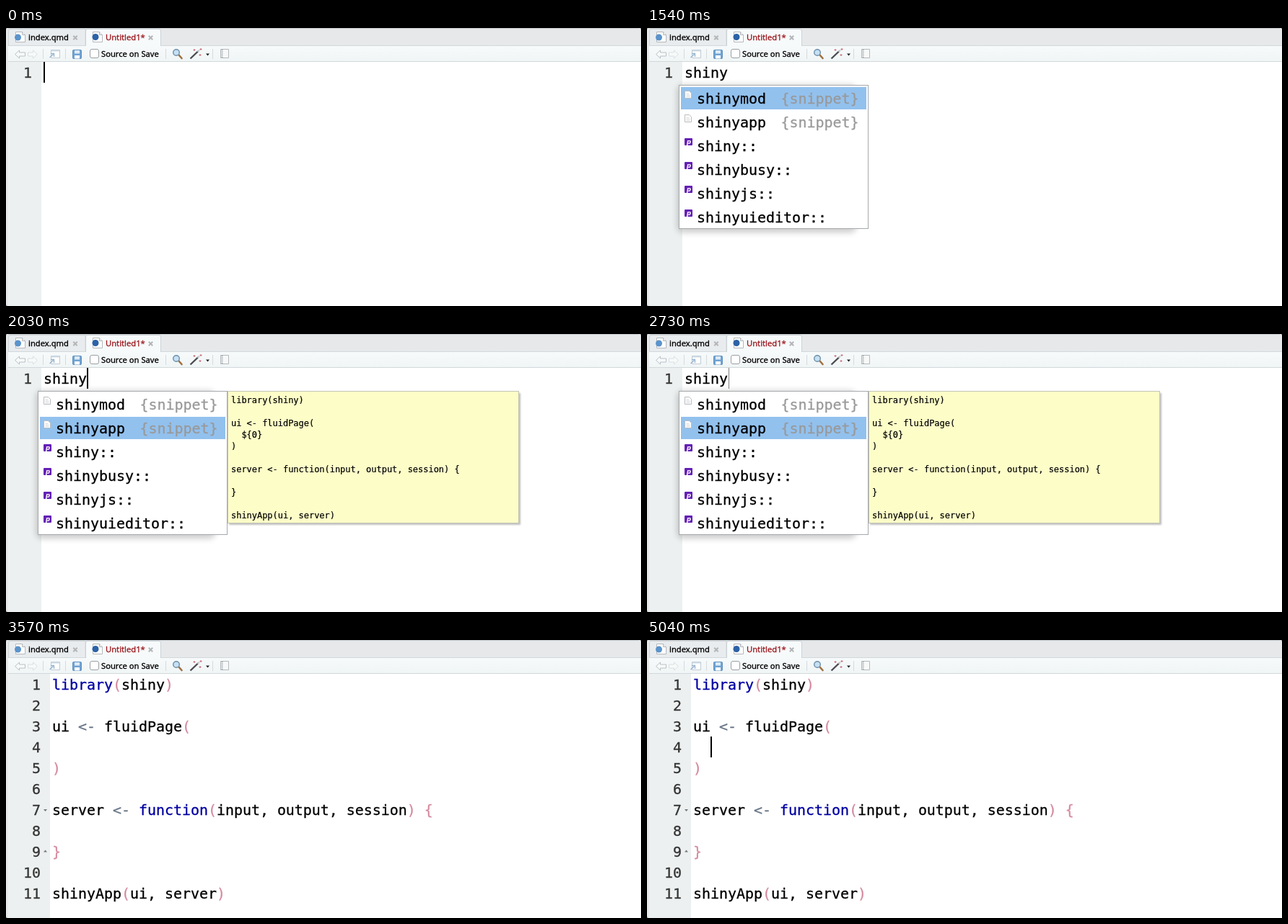
Animation, 880 px wide and 386 px high, one loop 5670 ms. Source, as an HTML page:

```html
<!DOCTYPE html>
<html lang="en">
<head>
<meta charset="utf-8">
<title>Snippet completion in a code editor</title>
<style>
  html, body { margin: 0; width: 100%; height: 100%; overflow: hidden; background: #fff; }
  svg { display: block; width: 880px; height: 386px; color: #000; }
  text { white-space: pre; }
  .ui, .mono, .small, tspan { fill: currentColor; stroke: currentColor; }
  .ui { font: 11.2px "Noto Sans", "Open Sans", sans-serif; stroke-width: .3px; }
  .mono { font: 19.93px "DejaVu Sans Mono", monospace; stroke-width: .3px; }
  .small { font: 11.96px "DejaVu Sans Mono", monospace; stroke-width: .2px; }
  .num { color: #333; text-anchor: end; }
  .key { color: #0000a2; }
  .op { color: #687687; }
  .paren { color: #d58a9f; }
  .hint { color: #999; }
</style>
</head>
<body>
<svg viewBox="0 0 880 386">
  <defs>
    <filter id="soft" x="-20%" y="-20%" width="140%" height="140%"><feGaussianBlur stdDeviation="4"/></filter>
    <filter id="tight"><feGaussianBlur stdDeviation="1.2"/></filter>
    <linearGradient id="bar" x2="0" y2="1">
      <stop stop-color="#f7fafb"/><stop offset="1" stop-color="#f0f5f6"/>
    </linearGradient>
    <g id="page">
      <path d="M.5.5h9l4 4v10H.5z" fill="#fff" stroke="#b4b8bb"/>
      <path d="M9.5.5v4h4" fill="#eee" stroke="#b4b8bb"/>
    </g>
    <path id="cross" d="M-2.7-2.7 2.7 2.7M2.7-2.7-2.7 2.7" stroke="#b3b5b7" stroke-width="2"/>
    <g id="sheet">
      <path d="M.5.5h6l3 3v7H.5z" fill="#fff" stroke="#b9bcc0"/>
      <path d="M2.5 4.5h4M2.5 6.5h5M2.5 8.5h5" stroke="#ccd0d3" stroke-width=".8"/>
    </g>
    <g id="package">
      <rect width="11" height="10" rx="1" fill="#6420b4"/>
      <text x="3" y="7.5" fill="#fff" font-family="DejaVu Sans, sans-serif" font-size="8.5" font-style="italic" font-weight="bold">p</text>
    </g>
  </defs>

  <rect width="880" height="386" fill="#8b9194"/>
  <rect width="880" height="386" rx="3" fill="#e6e8ea"/>
  <path d="M3 .5H877" stroke="#bfc5c8"/>
  <rect x="3" y="47" width="877" height="339" fill="#fff"/>

  <!-- tabs -->
  <path d="M3.5 25V4q0-2.5 2.5-2.5H110V25z" fill="#e9ecee" stroke="#d0d5d8"/>
  <path d="M110.5 26V4q0-2.5 2.5-2.5h99q2.5 0 2.5 2.5V26z" fill="#f7fafb" stroke="#ccd2d5"/>
  <use href="#page" x="13" y="5"/>
  <circle cx="16.5" cy="13" r="4.5" fill="#5b93cb"/>
  <text class="ui" x="31" y="17">index.qmd</text>
  <use href="#cross" x="96" y="13.5"/>
  <use href="#page" x="120" y="5"/>
  <circle cx="124" cy="12.5" r="4.5" fill="#2c62a6"/>
  <text class="ui" x="138" y="17" color="#9c1b20">Untitled1*</text>
  <use href="#cross" x="200.5" y="13.5"/>

  <!-- toolbar -->
  <rect x="3" y="25" width="877" height="21" fill="url(#bar)"/>
  <path d="M3 24.5H110M215 24.5H880M3 46.5H880" stroke="#d2d8da"/>
  <path d="M51.5 29v14M82.5 29v14M221.5 29v14M286.5 29v14" stroke="#d5dadc"/>
  <g fill="#f8fafa" stroke="#b9c1c5">
    <path d="M12.5 36.5l6-5.500v3h8v5h-8v3z"/>
    <path d="M43.5 36.5l-6-5.500v3h-7v5h7v3z" stroke="#d9dfe1"/>
  </g>
  <path d="M62.5 30.5h12v11h-12z" fill="#fff" stroke="#c0cbd4"/>
  <path d="M63 31.5h11" stroke="#cddae5" stroke-width="2"/>
  <path d="M60.500 41l5-4.500M62 35.500h4.500v4.500" fill="none" stroke="#95b4d0" stroke-width="1.300"/>
  <rect x="92.5" y="30.5" width="12" height="12" rx="1" fill="#6fa3d3" stroke="#5f91bf"/>
  <path d="M95 31h7v4.500h-7z" fill="#dceaf5"/>
  <path d="M95 38h7v4.500h-7z" fill="#fff"/>
  <rect x="116.5" y="29.5" width="12" height="12" rx="2.5" fill="#fff" stroke="#9b9fa2"/>
  <text class="ui" x="132" y="39.5">Source on Save</text>
  <path d="M239.5 37.5l4 4.500" stroke="#a1703d" stroke-width="2.600" stroke-linecap="round"/>
  <circle cx="236" cy="34" r="4.3" fill="#c5e0f3" stroke="#6f8fa9" stroke-width="1.4"/>
  <path d="M255.5 42.5l11-10.500" stroke="#4c4c50" stroke-width="2.400"/>
  <path d="M265.5 33l2.500-2.500" stroke="#c9ced2" stroke-width="2.400"/>
  <path d="M261 29v3M259.5 30.5h3M270 28v3M268.5 29.5h3M269 36v3M267.5 37.5h3" stroke="#c86b76"/>
  <path d="M277 35.5h5l-2.500 3z" fill="#222"/>
  <path d="M297.5 29.5h11v12h-11z" fill="#f7f8f8" stroke="#b5babd"/>
  <path d="M299.5 30v11" stroke="#9ca2a6" stroke-width="2" stroke-dasharray="1 1"/>

  <!-- editor -->
  <rect id="gutter" x="3" y="47" height="339" fill="#edf0f0"/>
  <g id="typing">
    <text class="mono num" x="36" y="69">1</text>
    <text class="mono" id="typed" x="52" y="69"></text>
  </g>
  <g id="code">
    <path d="M52 235h5l-2.500 3zM52 294.500h5l-2.500-3z" fill="#777"/>
  </g>
  <rect id="caret" height="29"/>

  <!-- completion list -->
  <g id="popup">
    <rect x="42" y="79" width="248" height="205" rx="8" opacity=".2" filter="url(#soft)"/>
    <rect x="44.5" y="79.5" width="262" height="199" fill="#fff" stroke="#a5a8ab"/>
    <rect id="selection" x="47" width="257" height="31" fill="#92c1ee"/>
  </g>
  <g id="tips"></g>
</svg>
<script>
const LOOP = 5670;
const ROW = 33, LINE = 29, CHAR = 12;
const TIP_LINE = 16, TIP_MAX = 243;
const $ = id => document.getElementById(id);

const items = ['shinymod', 'shinyapp', 'shiny::', 'shinybusy::', 'shinyjs::', 'shinyuieditor::'];

const moduleSnippet = `\${1:name}UI <- function(id) {
  ns <- NS(id)
  tagList(
  \${0}
  )
}

\${1:name}Server <- function(id) {
  moduleServer(
    id,
    function(input, output, session) {

    }
  )
}`;

const appSnippet = `library(shiny)

ui <- fluidPage(
  \${0}
)

server <- function(input, output, session) {

}

shinyApp(ui, server)`;

// Each step changes only the listed parts of the state.
const steps = [
  [0, { typed: 0, caret: 1, selected: -1, tip: -1, inserted: false }],
  [210, { typed: 1 }],
  [420, { typed: 2 }],
  [630, { typed: 3 }],
  [840, { typed: 4 }],
  [910, { typed: 5 }],
  [1260, { selected: 0 }],
  [1540, { caret: 0 }],
  [1890, { tip: 0 }],
  [1960, { selected: 1, caret: 1 }],
  [2030, { tip: 1 }],
  [2590, { caret: 0 }],
  [2730, { caret: .5 }],
  [2870, { selected: -1, tip: -1, inserted: true, caret: 0 }],
  [2940, { caret: 1 }],
  [3570, { caret: 0 }],
  [3990, { caret: 1 }],
  [4620, { caret: 0 }],
  [5040, { caret: 1 }]
];

const escapeText = s => s.replace(/&/g, '&amp;').replace(/</g, '&lt;');
const text = (cls, x, y, body) => `<text class="${cls}" x="${x}" y="${y}">${body}</text>`;
const add = (id, markup) => $(id).insertAdjacentHTML('beforeend', markup);

function highlight(line) {
  return line.split(/(library|function|<-|[(){}])/).map(part => {
    const cls = /^(library|function)$/.test(part) ? 'key'
      : part === '<-' ? 'op'
      : /^[(){}]$/.test(part) ? 'paren' : '';
    return cls ? `<tspan class="${cls}">${escapeText(part)}</tspan>` : escapeText(part);
  }).join('');
}

appSnippet.replace('${0}', '').split('\n').forEach((line, i) => {
  const y = 69 + i * LINE;
  add('code', text('mono num', 48, y, i + 1) + text('mono', 64, y, highlight(line)));
});

items.forEach((name, i) => {
  const y = 105 + i * ROW, snippet = i < 2;
  add('popup', `<use href="#${snippet ? 'sheet' : 'package'}" x="52" y="${y - 18}"/>`
    + text('mono', 69, y, name)
    + (snippet ? text('mono hint', 185.5, y, '{snippet}') : ''));
});

[moduleSnippet, appSnippet].forEach(body => {
  const lines = body.split('\n');
  const height = Math.min(lines.length * TIP_LINE + 7, TIP_MAX);
  add('tips', `<g>
    <rect x="309" y="82" width="404" height="${height}" opacity=".25" filter="url(#tight)"/>
    <rect x="307.5" y="79.5" width="403" height="${height}" fill="#fdfdc8" stroke="#c4c4b6"/>
    ${lines.map((line, i) => text('small', 312, 96 + i * TIP_LINE, escapeText(line))).join('')}
  </g>`);
});

const tips = [...$('tips').children];
const show = (el, on) => el.style.display = on ? '' : 'none';

function draw(time) {
  const s = Object.assign({}, ...steps.filter(([at]) => at <= time).map(([, change]) => change));
  show($('typing'), !s.inserted);
  show($('code'), s.inserted);
  show($('popup'), s.selected >= 0);
  tips.forEach((tip, i) => show(tip, i === s.tip));
  $('gutter').setAttribute('width', s.inserted ? 58 : 46);
  $('typed').textContent = 'shiny'.slice(0, s.typed);
  $('selection').setAttribute('y', 82 + Math.max(0, s.selected) * ROW);

  // A half-strength caret is a thin line at the right of its cell.
  const caret = $('caret');
  const x = s.inserted ? 88 : 52 + s.typed * CHAR;
  caret.setAttribute('x', s.caret === .5 ? x + 1 : x);
  caret.setAttribute('y', s.inserted ? 47 + 3 * LINE : 47);
  caret.setAttribute('width', 2 * s.caret);
  caret.setAttribute('opacity', s.caret);
}

const start = performance.now();
function tick() {
  draw((performance.now() - start) % LOOP);
  requestAnimationFrame(tick);
}
tick();
</script>
</body>
</html>
```
